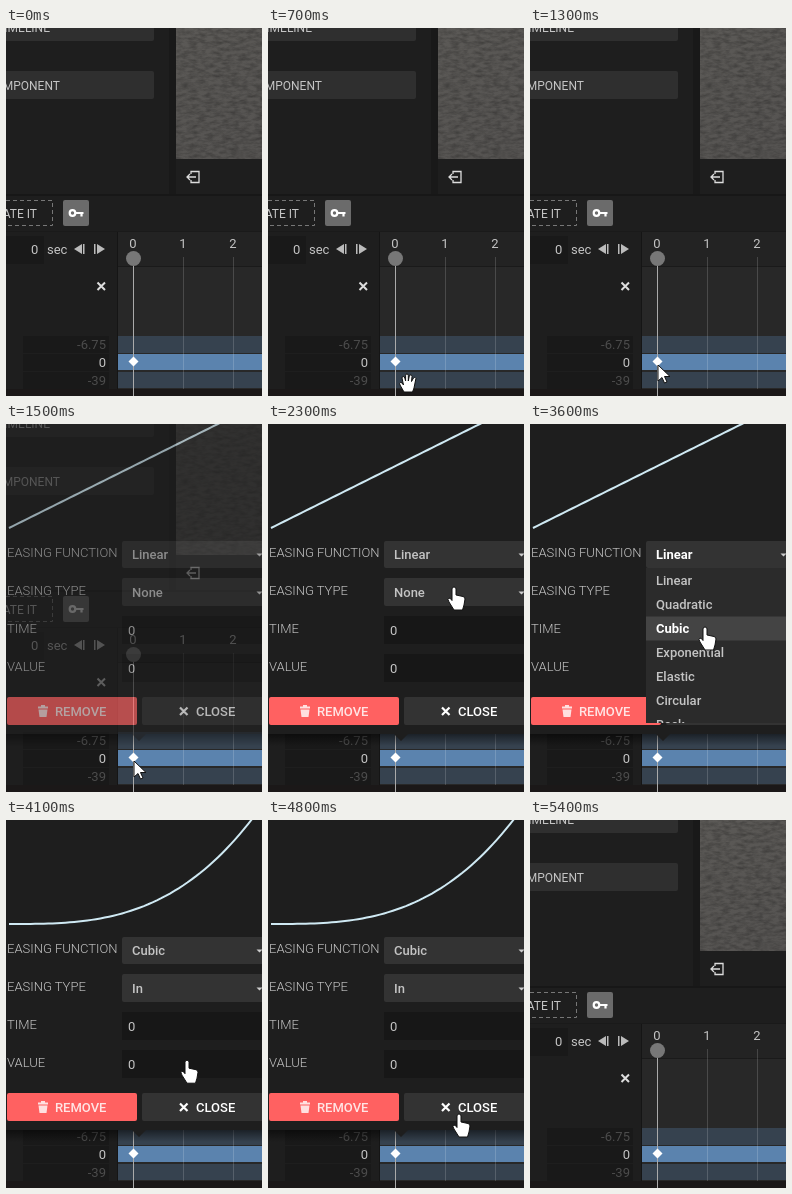
Animation, 256 px wide and 368 px high, one loop 6 s. Source, as an HTML page:

```html
<!DOCTYPE html>
<html lang="en">
<head>
<meta charset="utf-8">
<title>Keyframe easing editor</title>
<style>
html, body { margin: 0; width: 100%; height: 100%; overflow: hidden; background: #1e1e1e; }
svg { display: block; width: 256px; height: 368px; font: 13px Roboto, sans-serif; fill: #c4c4c4; cursor: default; }
.small { font-size: 12px; }
.end { text-anchor: end; }
.mid { text-anchor: middle; }
.dim { fill: #4c4c4c; }
.medium { font-weight: 500; }
.light { font-weight: 300; }
.strong { font-weight: 700; fill: #fff; }
</style>
</head>
<body>
<svg viewBox="0 0 256 368">
  <defs>
    <linearGradient id="wall" x2="0.4" y2="1">
      <stop stop-color="#5b5956"/><stop offset="1" stop-color="#565452"/>
    </linearGradient>
    <linearGradient id="shade" x2="0" y2="1">
      <stop stop-color="#000" stop-opacity=".5"/><stop offset="1" stop-color="#000" stop-opacity="0"/>
    </linearGradient>
    <filter id="grain" x="0" y="0" width="1" height="1">
      <feTurbulence type="fractalNoise" baseFrequency=".12 .3" numOctaves="3" seed="4"/>
      <feColorMatrix values="0 0 0 0 0  0 0 0 0 0  0 0 0 0 0  .5 0 0 0 -.17"/>
    </filter>
    <clipPath id="listClip"><path d="M116 117H256V299H116Z"/></clipPath>
  </defs>

  <g id="editor">
    <path fill="#1e1e1e" d="M0 0H256V368H0Z"/>
    <path fill="#191919" d="M163 0h7V167h-7Z"/>
    <path fill="url(#wall)" d="M170 0h86V131h-86Z"/>
    <path filter="url(#grain)" d="M170 0h86V131h-86Z"/>
    <path fill="#2f2f2f" d="M0 0H148V11q0 2-2 2H0ZM0 43H146q2 0 2 2V69q0 2-2 2H0Z"/>
    <g class="small end">
      <text x="44" y="4">TIMELINE</text>
      <text x="54" y="62">COMPONENT</text>
    </g>
    <path fill="none" stroke="#ddd" stroke-width="1.3" d="M185 146V143.500H193V154.500H185V152M190 149H181M184 146L181 149L184 152"/>

    <path fill="#171717" d="M0 166H256V168H0Z"/>
    <path fill="none" stroke="#777" stroke-dasharray="4 3" d="M0 172.500H46.500V197.500H0"/>
    <text class="small end" x="31" y="190">CREATE IT</text>
    <rect x="57" y="172" width="26" height="26" rx="2" fill="#6b6b6b"/>
    <g fill="none" stroke="#fff" stroke-width="2.200">
      <circle cx="66.500" cy="185" r="2.800"/><path d="M69 185H77.500M75.500 185V188.500"/>
    </g>

    <path fill="#191919" d="M0 208H38V236H0Z"/>
    <path fill="#232323" d="M112 203H256V238H112Z"/>
    <path fill="#282828" d="M112 238H256V361H112Z"/>
    <path fill="#151515" d="M111 203h1V361h-1Z"/>
    <path fill="#1a1a1a" d="M0 203H256v1H0ZM112 238H256v1H112Z"/>
    <text x="25" y="226">0</text><text x="41" y="226">sec</text>
    <path fill="#bbb" d="M76 216V226L68 221ZM77 216h1.500v10H77ZM88 216h1.500v10H88ZM91 216V226L99 221Z"/>
    <g class="mid"><text x="127" y="220">0</text><text x="177" y="220">1</text><text x="227" y="220">2</text></g>
    <path stroke="#ddd" stroke-width="2" d="M91.500 254.500L99 262M99 254.500L91.500 262"/>

    <path fill="#191919" d="M17 308H103V325H17ZM17 326H103V343H17ZM17 344H103V361H17Z"/>
    <g class="end">
      <text class="dim" x="100" y="321">-6.75</text><text x="100" y="339">0</text><text class="dim" x="100" y="357">-39</text>
    </g>
    <path fill="#36424f" d="M112 308H256V325H112ZM112 344H256V360H112Z"/>
    <path fill="#5b83ae" d="M112 326H256V342H112Z"/>
    <path stroke="#fff" stroke-opacity=".16" d="M177.500 229V361M227.500 229V361"/>
    <path stroke="#aaa" d="M127.500 238V368"/>
    <circle cx="127.500" cy="230.500" r="7.500" fill="#777"/>
    <path fill="#fff" d="M127.500 328.500L132.500 333.500L127.500 338.500L122.500 333.500Z"/>
    <path fill="#1b1818" d="M0 361H127V368H0ZM128 361H256V368H128Z"/>
  </g>

  <g id="popup">
    <path fill="url(#shade)" d="M0 310H256V322H0Z"/>
    <path fill="#1e1e1e" d="M0 0H256V310H140L133 317L126 310H0Z"/>
    <path id="curve" fill="none" stroke="#cfe9f3" stroke-width="2"/>
    <g class="light">
      <text x="1" y="133">EASING FUNCTION</text><text x="1" y="171">EASING TYPE</text>
      <text x="1" y="209">TIME</text><text x="1" y="247">VALUE</text>
    </g>
    <path fill="#333" d="M118 117H256V144H118q-2 0-2-2V119q0-2 2-2ZM118 154H256V182H118q-2 0-2-2V156q0-2 2-2Z"/>
    <path fill="#171717" d="M116 192H256V220H116ZM116 230H256V258H116Z"/>
    <path fill="#ccc" d="M250.500 129.500h6l-3 3ZM250.500 167.500h6l-3 3Z"/>
    <g class="medium">
      <text id="easing" x="126" y="135"/><text id="type" x="126" y="173"/>
    </g>
    <text x="122" y="211">0</text><text x="122" y="249">0</text>
    <rect x="1" y="273" width="130" height="28" rx="2" fill="#ff6161"/>
    <rect x="136" y="273" width="122" height="28" rx="2" fill="#333"/>
    <path fill="#ffe0e0" d="M32 282.500h3v-1.500h4v1.500h3v2H32ZM32.500 285.500h9L40.500 293h-7Z"/>
    <path stroke="#fff" stroke-width="2.200" d="M174 283.500L181.500 291M181.500 283.500L174 291"/>
    <g class="medium">
      <text x="49" y="292" fill="#ffe4e4">REMOVE</text><text x="190" y="292" fill="#fff">CLOSE</text>
    </g>
    <g id="list" clip-path="url(#listClip)">
      <path fill="#2b2b2b" d="M116 144H256V299H116Z"/>
      <rect id="hover" x="116" width="140" height="24" fill="#444"/>
    </g>
  </g>

  <path id="cursor" fill="#fff" stroke="#111" stroke-linejoin="round"/>
</svg>
<script>
const $ = id => document.getElementById(id);
const LOOP = 6000, STEP = 100, ROW = 24, LIST_TOP = 144.5;
const OPEN = 2700, PICK = 3900;

const shapes = {
  arrow: 'M0 0V16L4 12.5 6.500 18 9 17 6.500 11.500H12Z',
  point: 'M-2 2a2 2 0 0 1 4 0V8l7 1.500q2 .6 2 2.500l-1 6-1.500 5H0L-5 15q-2-3 0-4 1.500 0 3 2.500Z',
  grab: 'M-4 9L-8 2q-1-2 .5-2.500T-4.500 2L-6-5q0-1.500 1.200-1.500T-3.200-5l.8 3V-7.500q0-1.500 1.300-1.500T.3-7.500V-2l1-5q.3-1.200 1.500-1T4-6.500L3.500-1.500 5.500-5q.8-1 1.800-.4T7.800-4L6 5 4.500 9Z'
};

// Cursor path: time, x, y, shape used from that time on
const path = [
  [300, 208, 380, 'grab'], [700, 140, 355, 'grab'], [1100, 133, 345, 'grab'],
  [1300, 128, 337, 'arrow'], [1800, 128, 337, 'arrow'], [2100, 142, 318, 'arrow'],
  [2300, 186, 163, 'point'], [2500, 178, 132, 'point'], [2900, 178, 134, 'point'],
  [3500, 175, 203, 'point'], [3900, 175, 203, 'point'], [4400, 190, 296, 'point'],
  [4500, 190, 296, 'point'], [4600, 193, 306, 'point'], [4700, 193, 306, 'point'],
  [4800, 191, 294, 'point'], [5000, 191, 300, 'grab'], [5100, 191, 305, 'grab'],
  [5400, 214, 380, 'grab']
];

const items = ['Linear', 'Quadratic', 'Cubic', 'Exponential', 'Elastic', 'Circular', 'Back'].map((name, i) => {
  const item = document.createElementNS('http://www.w3.org/2000/svg', 'text');
  item.textContent = name;
  item.setAttribute('x', 126);
  item.setAttribute('y', 161 + ROW * i);
  $('list').append(item);
  return item;
});

const clamp = v => Math.max(0, Math.min(1, v));
const show = (el, on) => el.style.display = on ? '' : 'none';

function curvePath(power) {
  const points = Array.from({ length: 61 }, (_, i) => [3 + 261 * i / 60, 104 - 130 * (i / 60) ** power]);
  return 'M' + points.join('L');
}
const linear = curvePath(1), cubic = curvePath(3);

function cursorAt(t) {
  const i = path.findIndex(p => p[0] > t);
  if (i < 1) return null;
  const [t0, x0, y0, shape] = path[i - 1], [t1, x1, y1] = path[i];
  const k = (t - t0) / (t1 - t0);
  return { x: x0 + (x1 - x0) * k, y: y0 + (y1 - y0) * k, shape };
}

function draw(t) {
  const picked = t >= PICK, open = t >= OPEN && !picked;
  $('popup').style.opacity = t < 3000 ? clamp((t - 1400) / 150) : clamp((5000 - t) / 200);
  $('curve').setAttribute('d', picked ? cubic : linear);
  $('easing').textContent = picked ? 'Cubic' : 'Linear';
  $('easing').setAttribute('class', open ? 'strong' : '');
  $('type').textContent = picked ? 'In' : 'None';

  const cursor = cursorAt(t);
  show($('cursor'), cursor);
  if (cursor) {
    $('cursor').setAttribute('d', shapes[cursor.shape]);
    $('cursor').setAttribute('transform', `translate(${cursor.x} ${cursor.y})`);
  }

  show($('list'), open);
  const row = open ? Math.floor((cursor.y - LIST_TOP) / ROW) : -1;
  show($('hover'), row >= 0);
  $('hover').setAttribute('y', LIST_TOP + ROW * row);
  items.forEach((item, i) => item.setAttribute('class', i === row ? 'strong' : 'medium'));
}

function tick() {
  draw(Math.floor(performance.now() % LOOP / STEP) * STEP);
  requestAnimationFrame(tick);
}
tick();
</script>
</body>
</html>
```
